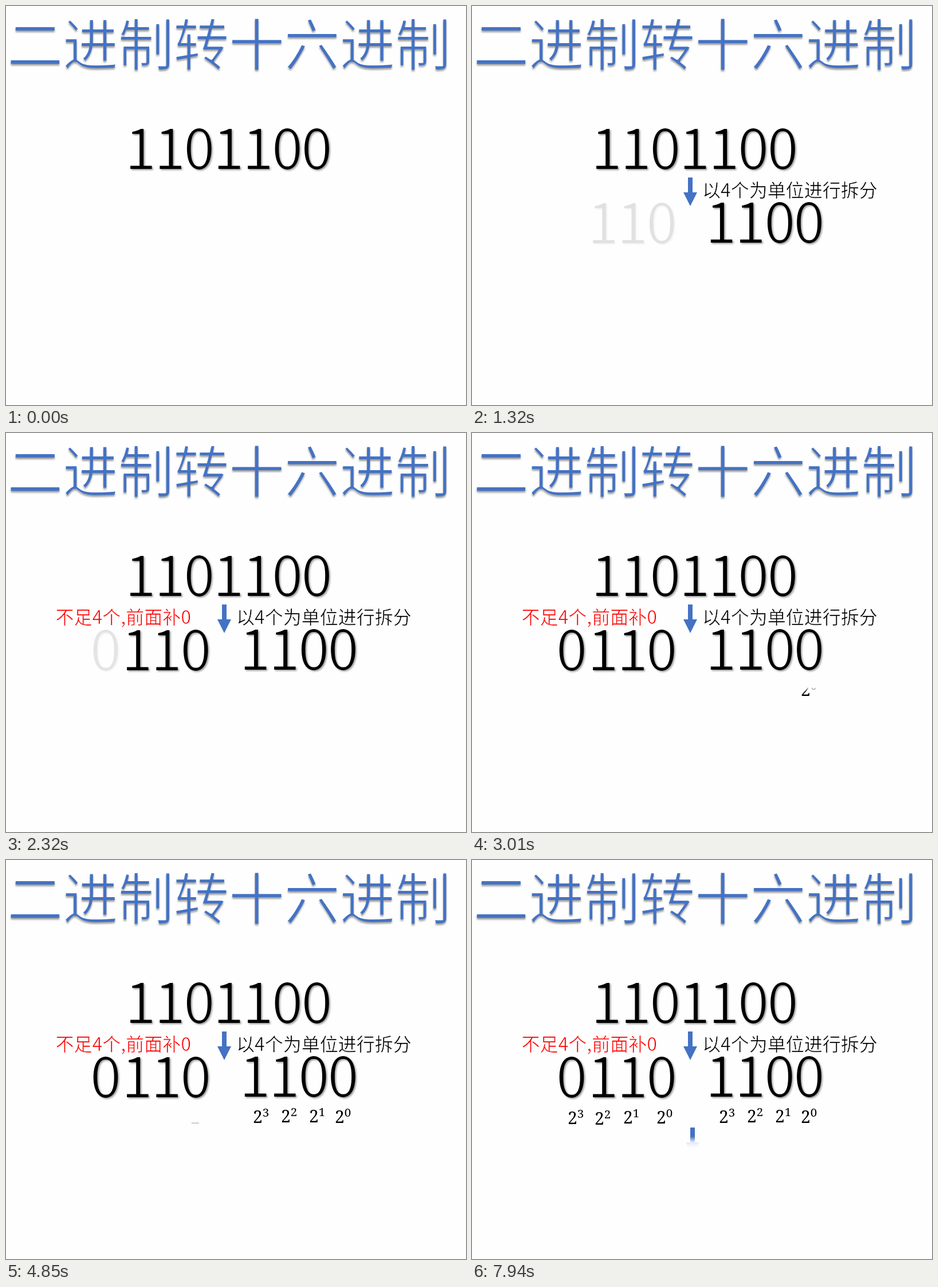
An HTML page that plays this animation: 803 px wide and 698 px high, repeating every 8000 ms.

```html
<!DOCTYPE html>
<html lang="zh-CN">
<head>
<meta charset="utf-8">
<title>二进制转十六进制</title>
<style>
  @property --t { syntax: "<number>"; inherits: true; initial-value: 0; }
  @keyframes clock { from { --t: 0; } to { --t: 8000; } }

  html, body { margin: 0; width: 100%; height: 100%; overflow: hidden; background: #fefefe; }
  #stage {
    position: relative; width: 803px; height: 698px; overflow: hidden;
    animation: clock 8s linear infinite;
  }
  svg { position: absolute; display: block; overflow: visible; }
  text { font-family: "Noto Sans CJK SC", "Noto Sans CJK", sans-serif; font-weight: 300; white-space: pre; }

  /* large type is thinned by a filter, small type by a background-coloured outline */
  .title {
    font-size: 97.5px; letter-spacing: -.8px; fill: #4472c4;
    filter: url(#thin) drop-shadow(0 3px 1.5px rgba(0, 0, 0, .38));
  }
  .bits {
    font-size: 98px; letter-spacing: -3.1px;
    filter: url(#thin) drop-shadow(2px 2px 1.5px rgba(0, 0, 0, .4));
  }
  .note { font-size: 32px; stroke: #fefefe; stroke-width: .7px; }
  .red { fill: #f00; }

  /* --s: start time in ms */
  .fade { opacity: calc((var(--t) - var(--s)) / 505); }

  .pow {
    width: 34px; height: 34px;
    --lead: calc(7px + (var(--t) - var(--s)) * .16px);
    mask-image: linear-gradient(to top, #000 calc(var(--lead) - 8px), transparent var(--lead));
  }
  .pow text { font: 30px "Noto Serif", serif; }
  .pow .exp { font-size: 20.5px; }

  .arrow {
    width: 24px; height: 50px; fill: #4472c4;
    --lead: calc((var(--t) - var(--s)) * var(--v) * 1px);
    mask-image: linear-gradient(to bottom, #000 calc(var(--lead) - 20px),
      rgba(0, 0, 0, .15) calc(var(--lead) - 10px), transparent var(--lead));
  }
</style>
</head>
<body>
<div id="stage">
  <svg width="803" height="698">
    <filter id="thin" color-interpolation-filters="sRGB"><feMorphology operator="erode" radius="1"/></filter>
    <text class="title" x="2" y="104">二进制转十六进制</text>
    <text class="bits" x="207.4" y="286">1101100</text>
    <text class="note fade" style="--s:260" x="402" y="334">以4个为单位进行拆分</text>
    <text class="bits fade" style="--s:760" x="407.3" y="415">1100</text>
    <text class="bits fade" style="--s:1265" x="201.5" y="415.5">110</text>
    <text class="note red fade" style="--s:1770" x="86.5" y="334">不足4个,前面补0</text>
    <text class="bits fade" style="--s:2272" x="146.8" y="416">0</text>
  </svg>
  <svg class="arrow" style="left:369px;top:300px;--s:60;--v:.15"><path d="M8 0h8v26h8L12 50 0 26h8z"/></svg>
  <svg class="arrow" style="left:373px;top:468px;--s:7230;--v:.05"><path d="M8 0h8v26h8L12 50 0 26h8z"/></svg>
</div>
<script>
  const stage = document.getElementById("stage");

  // left edge, baseline, exponent, start of the upward wipe
  const powers = [
    [574, 460, 0, 2915], [529, 459, 1, 3375], [480, 459, 2, 3915], [431, 460, 3, 4375],
    [322, 461, 0, 4835], [264, 461, 1, 5375], [214, 463, 2, 5835], [167, 462, 3, 6375]
  ];
  for (const [x, base, exp, start] of powers) {
    stage.insertAdjacentHTML("beforeend",
      `<svg class="pow" style="left:${x}px;top:${base - 27}px;--s:${start}">` +
      `<text x="0" y="27">2<tspan class="exp" dy="-11.4">${exp}</tspan></text></svg>`);
  }
</script>
</body>
</html>
```
